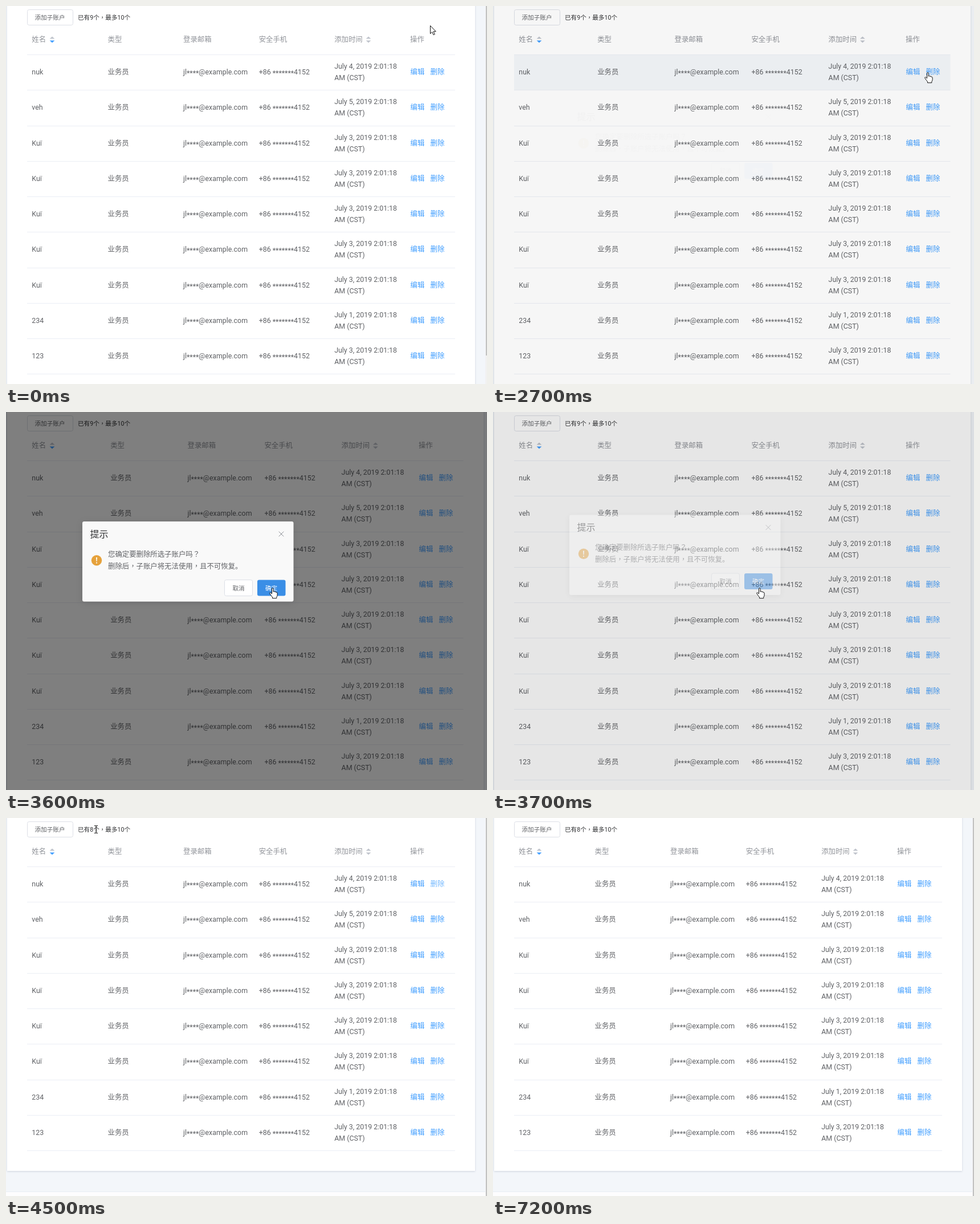
An HTML page for the animation above (7.3 s loop, 844x663 px).

```html
<!DOCTYPE html>
<html lang="zh-CN">
<head>
<meta charset="utf-8">
<title>子账户</title>
<style>
  html, body { margin: 0; width: 100%; height: 100%; overflow: hidden; background: #f3f6fa; }
  #stage { position: relative; width: 844px; height: 663px; overflow: hidden; background: #f3f6fa; }
  #card { position: absolute; left: 2px; top: -20px; background: #fff; box-shadow: 0 1px 3px rgba(70, 85, 120, .22); }
  #footer { position: absolute; left: 0; top: 655px; width: 844px; height: 8px; background: #fdfdfe; border-top: 1px solid #e8edf4; box-sizing: border-box; }
  svg { position: absolute; left: 0; top: 0; }
  text { font: 12.4px Roboto, "Noto Sans CJK SC", "Noto Sans CJK", sans-serif; fill: #606266; white-space: pre; }
  .centred { font-family: "Noto Sans CJK TC", "Noto Sans CJK", sans-serif; }
  .head { fill: #909399; }
  .link { fill: #409eff; }
  .link.focus { fill: #73b8ff; }
  .small { font-size: 10.6px; }
  .dark { fill: #303133; }
  .title { font-size: 16px; fill: #303133; }
  .mid { text-anchor: middle; }
  .white { fill: #fff; }
  .btn { fill: #fff; stroke: #dcdfe6; }
  #panel { filter: drop-shadow(0 2px 6px rgba(0, 0, 0, .12)); }
  .cursor path { fill: #fff; stroke: #111; stroke-width: 1; stroke-linejoin: round; }
</style>
</head>
<body>
<div id="stage">
  <div id="card"></div>
  <div id="footer"></div>
  <svg width="844" height="663" viewBox="0 0 844 663">
    <g id="hovers"></g>
    <rect class="btn" x="37.5" y="6.5" width="80" height="27" rx="3"/>
    <text class="small mid" x="77" y="24">添加子账户</text>
    <text class="small dark" id="count" x="126" y="24"></text>
    <g id="table"></g>
    <g id="scrollbar">
      <rect x="841" width="3" height="663" fill="#f1f1f1"/>
      <rect id="thumb" x="842" width="2" fill="#c1c1c1"/>
    </g>
    <rect id="overlay" width="844" height="663"/>
    <g id="dialog">
      <rect id="panel" x="134" y="192" width="370.5" height="140.5" rx="3" fill="#f9f9f9"/>
      <text class="title" x="147.5" y="220">提示</text>
      <path d="M478.7 209.7l8.6 8.6m0-8.6l-8.6 8.6" stroke="#909399" fill="none"/>
      <circle cx="159" cy="260.3" r="9.2" fill="#e6a23c"/>
      <path d="M158 255h2l-.4 7h-1.2z" fill="#fff"/>
      <circle cx="159" cy="264.6" r="1.1" fill="#fff"/>
      <text x="179" y="253.5">您确定要删除所选子账户吗<tspan class="centred" lang="zh-TW">？</tspan></text>
      <text x="179" y="274.5">删除后<tspan class="centred" lang="zh-TW">，</tspan>子账户将无法使用<tspan class="centred" lang="zh-TW">，</tspan>且不可恢复。</text>
      <rect class="btn" x="383.5" y="294.5" width="49" height="28" rx="3"/>
      <text class="small mid" x="408" y="312.5">取消</text>
      <rect id="confirm" x="441" y="294.5" width="49.5" height="28" rx="3"/>
      <text class="small mid white" x="465.5" y="312.5">确定</text>
    </g>
    <g class="cursor" id="arrow"><path d="M.5.5v14l3.3-3 2.3 5.2 2.2-1-2.2-5h4.2z"/></g>
    <g class="cursor" id="hand"><path d="M4.5 11V2.2Q4.5.7 5.8.7t1.3 1.5v5.2q.3-1.3 1.5-1 1 .1 1 1.5.5-1 1.6-.7.9.2.9 1.5.5-.7 1.2-.4.8.3.8 1.6v3.4q0 1.8-1.3 3.2v2.2H5.5v-1.9Q3.7 14.7 1 10.7q-.7-1.3.2-1.8 1-.5 2 .7z"/></g>
    <g class="cursor" id="beam"><path d="M-3-6.5h2q1 0 1 1 0-1 1-1h2M0-5.5v11M-3 6.5h2q1 0 1-1 0 1 1 1h2" style="fill:none"/></g>
  </svg>
</div>
<script>
const LOOP = 7300, FRAME = 100, PITCH = 62.22;
const el = id => document.getElementById(id);
const show = (id, on) => { el(id).style.display = on ? '' : 'none'; };

// Masking stars sit at mid height.
const masked = str => str.replace(/(\*+)(.*)/, '<tspan dy="2">$1</tspan><tspan dy="-2">$2</tspan>');
const EMAIL = masked('jl****@example.com'), PHONE = masked('+86 *******4152');
const people = [
  ['nuk', 4], ['veh', 5],
  ...Array.from({ length: 5 }, () => ['Kuï', 3]),
  ['234', 1], ['123', 3]
];
const heads = ['姓名', '类型', '登录邮箱', '安全手机', '添加时间', '操作'];
const narrow = { cols: [45.3, 178.6, 311, 443.7, 576.2, 709], right: 788, card: 821 };
const wide = { cols: [45.3, 183.2, 318.5, 453.4, 588.6, 724], right: 802.5, card: 836 };

const lineY = k => Math.round(85.2 + PITCH * k);
const label = (x, y, str, cls = '') => `<text class="${cls}" x="${x}" y="${y}">${str}</text>`;
const rule = (k, right) => `<rect x="37" y="${lineY(k)}" width="${right - 37}" height="1" fill="#ebeef5"/>`;
const sorter = (x, down) =>
  `<path d="M${x - 4.4} 57.5h8.8l-4.4-4z" fill="#c0c4cc"/><path d="M${x - 4.4} 60.5h8.8l-4.4 4z" fill="${down}"/>`;

function tableMarkup(layout, rows, focused) {
  const c = layout.cols;
  const head = heads.map((h, i) => label(c[i], 63.3, h, 'head')).join('')
    + sorter(81, '#409eff') + sorter(c[4] + 59.8, '#c0c4cc') + rule(0, layout.right);
  return head + rows.map(([name, day], i) => {
    const mid = 116 + PITCH * i, y = Math.round(mid + 4.2);
    return label(c[0], y, name) + label(c[1], y, '业务员')
      + label(c[2], y, EMAIL) + label(c[3], y, PHONE)
      + label(c[4], Math.round(mid - 5.8), `July ${day}, 2019 2:01:18`)
      + label(c[4], Math.round(mid + 14.2), 'AM (CST)')
      + label(c[5] + .5, y, '编辑', 'link')
      + label(c[5] + 35.5, y, '删除', focused && i === 0 ? 'link focus' : 'link')
      + rule(i + 1, layout.right);
  }).join('');
}

// CSS "ease": cubic-bezier(.25, .1, .25, 1)
function ease(x) {
  if (x <= 0) return 0;
  if (x >= 1) return 1;
  const bez = (a, b, s) => 3 * a * s * (1 - s) ** 2 + 3 * b * s * s * (1 - s) + s ** 3;
  let lo = 0, hi = 1;
  for (let i = 0; i < 20; i++) {
    const s = (lo + hi) / 2;
    if (bez(.25, .25, s) < x) lo = s; else hi = s;
  }
  return bez(.1, 1, lo);
}
const pulse = (t, from, to, len) => ease((t - from) / len) - ease((t - to) / len);

// time, x, y, pointer shape
const track = [
  [0, 744, 34, 'arrow'], [100, 690, 40, 'arrow'], [300, 440, 45, 'arrow'], [500, 210, 46, 'arrow'],
  [600, 165, 32, 'arrow'], [700, 150, 20, 'beam'], [800, 136, 18, 'beam'], [900, 146, 20, 'beam'],
  [1000, 77, 67, 'hand'], [1100, 42, 92, 'arrow'], [1200, 21, 110, 'arrow'], [1300, 72, 112, 'arrow'],
  [1400, 180, 127, 'arrow'], [1500, 310, 133, 'arrow'], [1600, 444, 130, 'arrow'],
  [2000, 680, 122, 'arrow'], [2100, 725, 116, 'hand'], [2300, 757, 116, 'hand'], [2800, 757, 116, 'hand'],
  [2900, 715, 145, 'arrow'], [3100, 560, 250, 'arrow'], [3300, 475, 305, 'hand'], [3400, 462, 308, 'hand'],
  [3800, 462, 308, 'hand'], [3900, 385, 215, 'arrow'], [4000, 280, 130, 'arrow'], [4100, 205, 100, 'arrow'],
  [4200, 143, 39, 'hand'], [4300, 150, 30, 'arrow'], [4400, 162, 20, 'beam'], [4700, 149, 20, 'beam'],
  [4800, 149, 20, 'beam'], [4900, 162, 20, 'beam'], [5000, 171, 21, 'beam'], [5100, 152, 21, 'beam'],
  [5300, 152, 21, 'beam'], [5400, 112, 52, 'hand'], [5500, 82, 100, 'arrow'], [5600, 66, 117, 'beam'],
  [5700, 62, 123, 'beam'], [6100, 66, 122, 'beam'], [6300, 58, 118, 'beam'], [6500, 54, 121, 'beam'],
  [6600, 0, 0, 'none']
];

function pointerAt(t) {
  const i = track.findLastIndex(k => k[0] <= t);
  const [t0, x0, y0, shape] = track[i];
  const [t1, x1, y1] = track[i + 1] || track[i];
  const p = t1 > t0 ? (t - t0) / (t1 - t0) : 0;
  return { x: Math.round(x0 + (x1 - x0) * p), y: Math.round(y0 + (y1 - y0) * p), shape };
}

// row, enter, leave
const hovers = [[0, 1220, 2720], [2, 3860, 3940], [0, 3960, 4150], [0, 5450, 6550]];
const hoverMarkup = (t, layout) => hovers.map(([row, enter, leave]) => {
  const alpha = pulse(t, enter, leave, 250);
  return alpha > 0
    ? `<rect x="37" y="${lineY(row) + 1}" width="${layout.right - 37}" height="${lineY(row + 1) - lineY(row) - 1}" fill="#f4f7fa" opacity="${alpha}"/>`
    : '';
}).join('');

let lastKey = '';
function render(t) {
  const modal = t >= 2650 && t < 3900, removed = t >= 3750, focused = removed && t < 7200;
  const layout = modal ? wide : narrow;
  const key = [modal, removed, focused].join();
  if (key !== lastKey) {
    lastKey = key;
    const rows = removed ? people.filter((_, i) => i !== 2) : people;
    el('table').innerHTML = tableMarkup(layout, rows, focused);
    el('count').innerHTML = `已有${rows.length}个<tspan class="centred" lang="zh-TW">，</tspan>最多10个`;
    el('card').style.width = layout.card + 'px';
    el('card').style.height = (removed ? 639 : 720) + 'px';
    el('thumb').setAttribute('height', removed ? 663 : 613);
    show('footer', removed);
    show('scrollbar', !modal);
  }
  el('hovers').innerHTML = hoverMarkup(t, layout);

  el('overlay').setAttribute('opacity', .5 * pulse(t, 2683, 3600, 200));
  const open = pulse(t, 2690, 3600, 300);
  show('dialog', open > 0);
  el('dialog').setAttribute('opacity', open);
  el('dialog').setAttribute('transform', `translate(0 ${-20 * (1 - open)})`);
  el('confirm').setAttribute('fill', t < 3300 ? '#409eff' : t < 3500 ? '#66b1ff' : '#3a8ee6');

  const { x, y, shape } = pointerAt(t);
  for (const id of ['arrow', 'hand', 'beam']) {
    show(id, id === shape);
    el(id).setAttribute('transform', `translate(${x} ${y})`);
  }
}

const start = performance.now();
function tick() {
  const t = (performance.now() - start) % LOOP;
  render(Math.floor(t / FRAME) * FRAME);
  requestAnimationFrame(tick);
}
tick();
</script>
</body>
</html>
```
